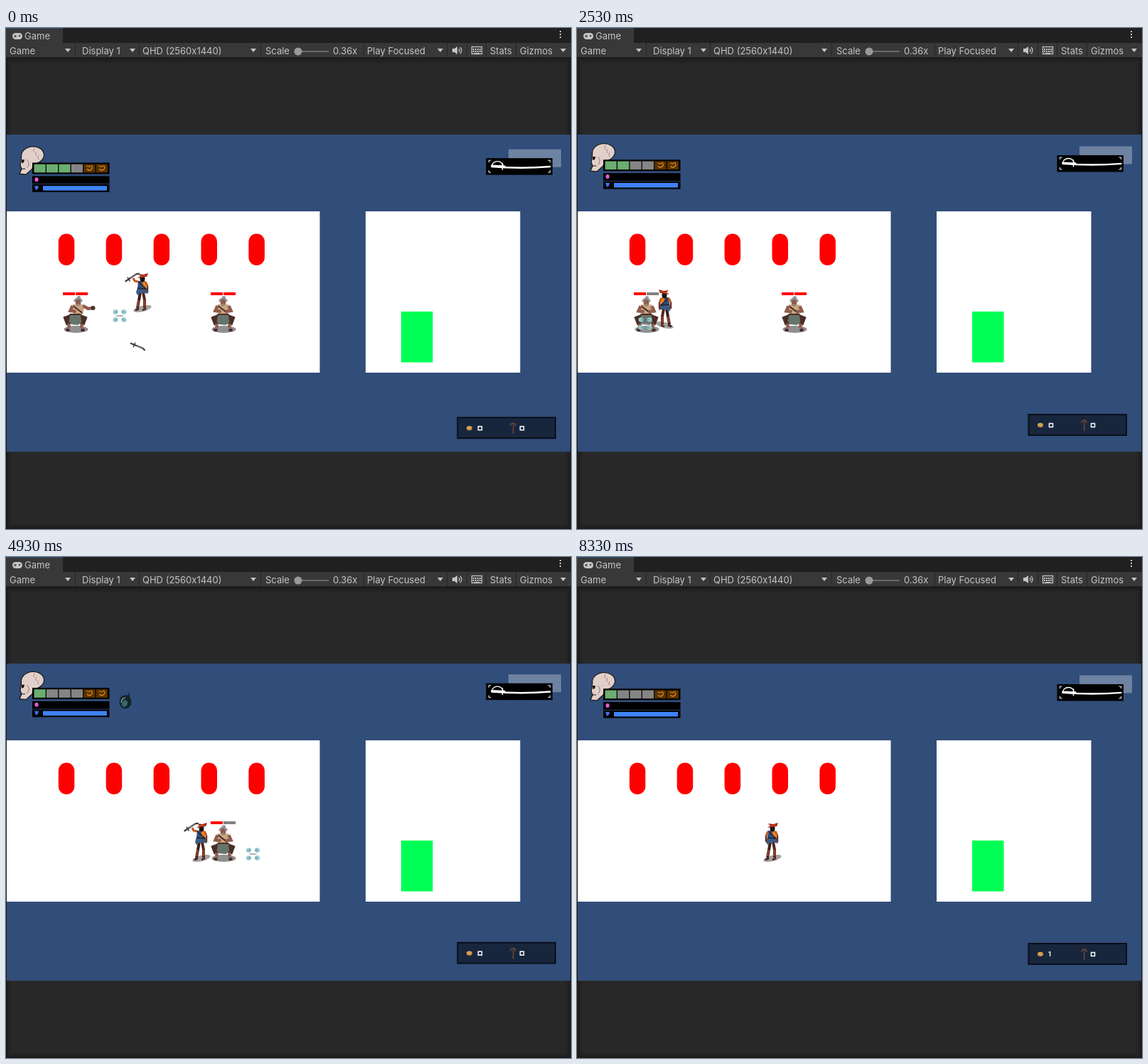
Recreate the animation shown at these times as an HTML page with a canvas. Size 795x705 px, loop 8.39 s.

```html
<!DOCTYPE html>
<html>
<head>
<meta charset="utf-8">
<style>
html, body { margin: 0; width: 100%; height: 100%; overflow: hidden; background: #282828; }
canvas { display: block; }
</style>
</head>
<body>
<canvas id="stage" width="795" height="705"></canvas>
<script>
const g = document.getElementById('stage').getContext('2d');
const LOOP = 8390, STEP = LOOP / 126, TAU = 2 * Math.PI;

// Each foe: position, punch, time hit, time of death
const foes = [
  { x: 97.5, punch: 630, hit: 2150, death: 2700 },
  { x: 305.5, punch: 4700, hit: 4190, death: 4950 },
];
const swings = [0, 2150, 2620, 4130, 4850];
const LOOT = 5130;

// Key points: time, x, y
const walk = [[0, 191, 345], [1250, 141, 370], [2200, 124, 368], [2700, 124, 368], [4200, 261, 374], [4900, 274, 374]];
const aim = [[0, 160, 405], [1330, 108, 400], [2530, 96, 416], [4000, 346, 418], [5400, 348, 418], [6530, 69, 250], [7300, 60, 640]];

const clamp = v => Math.max(0, Math.min(1, v));
const during = (t, start, length) => t >= start && t < start + length;
const sides = draw => [-1, 1].forEach(draw);

function at(keys, t) {
  const i = keys.findIndex(k => k[0] > t);
  if (i < 0) return keys.at(-1).slice(1);
  const a = keys[i - 1], b = keys[i], p = (t - a[0]) / (b[0] - a[0]), e = p * p * (3 - 2 * p);
  return [a[1] + (b[1] - a[1]) * e, a[2] + (b[2] - a[2]) * e];
}

function box(c, x, y, w, h) { g.fillStyle = c; g.fillRect(x, y, w, h); }

function trace(p) {
  g.beginPath();
  for (let i = 0; i < p.length; i += 2) g.lineTo(p[i], p[i + 1]);
}

function poly(c, ...p) { trace(p); g.fillStyle = c; g.fill(); }

function limb(c, w, ...p) {
  trace(p);
  g.strokeStyle = c;
  g.lineWidth = w;
  g.stroke();
}

function oval(c, x, y, rx, ry = rx, tilt = 0) {
  g.fillStyle = c;
  g.beginPath();
  g.ellipse(x, y, rx, ry, tilt, 0, TAU);
  g.fill();
}

function arc(c, w, x, y, rx, ry, from, to, tilt = 0) {
  g.strokeStyle = c;
  g.lineWidth = w;
  g.beginPath();
  g.ellipse(x, y, rx, ry, tilt, from * TAU, to * TAU);
  g.stroke();
}

function pill(c, x, y, w, h) {
  g.fillStyle = c;
  g.beginPath();
  g.roundRect(x, y, w, h, Math.min(w, h) / 2);
  g.fill();
}

function text(s, x, y, size = 13, c = '#c4c4c4', weight = 400) {
  g.font = `${weight} ${size}px Inter, sans-serif`;
  g.fillStyle = c;
  g.fillText(s, x, y);
}

function placed(x, y, draw, { angle = 0, flip = 1, alpha = 1 } = {}) {
  g.save();
  g.globalAlpha *= alpha;
  g.translate(x, y);
  g.rotate(angle);
  g.scale(flip, 1);
  draw();
  g.restore();
}

function toolbar() {
  const ink = '#c4c4c4', bar = '#383838', gap = '#202020';
  box('#282828', 0, 0, 795, 705);
  for (let i = 0; i < 10; i++) {
    g.lineWidth = 1;
    g.strokeStyle = `rgba(18,18,18,${0.6 * (1 - i / 10) ** 2})`;
    g.strokeRect(i + .5, 42.5 + i, 794 - 2 * i, 662 - 2 * i);
  }
  box(gap, 0, 0, 795, 42);
  box(bar, 0, 0, 80, 21);
  box('#27506f', 0, 0, 80, 1);
  box(bar, 0, 21, 795, 20);
  for (const x of [97, 187, 358, 503, 620, 648, 675, 717]) box('#252525', x, 21, 1, 20);
  for (const x of [87, 178, 348, 611, 784]) poly(ink, x - 4, 29, x + 4, 29, x, 34);
  for (let i = 0; i < 3; i++) box(ink, 779, 4 + 4 * i, 2, 2);

  pill(ink, 9, 7, 14, 9);
  limb(bar, 1, 11, 11.5, 15, 11.5);
  limb(bar, 1, 13, 9.5, 13, 13.5);
  box(bar, 18, 10, 2, 2);
  text('Game', 26, 16);
  const labels = { 5: 'Game', 107: 'Display 1', 192: 'QHD (2560x1440)', 365: 'Scale',
    460: '0.36x', 508: 'Play Focused', 681: 'Stats', 723: 'Gizmos' };
  for (const x in labels) text(labels[x], +x, 37);
  box('#6a6a6a', 411, 32, 43, 2);
  oval('#999', 411, 33, 5.5);

  poly(ink, 628, 29, 631, 29, 635, 26, 635, 37, 631, 34, 628, 34);
  for (const r of [3, 6]) arc(ink, 1.3, 635, 31.5, r, r, -.14, .14);
  g.strokeRect(655.5, 26.5, 14, 10);
  for (let i = 0; i < 8; i++) box(ink, 657 + i % 4 * 3, i < 4 ? 29 : 32, 2, 2);
  box(ink, 659, 35, 7, 1);
}

function scene() {
  box('#314d79', 1, 150, 793, 446.5);
  box('#fff', 1, 258, 440.5, 227);
  box('#fff', 506, 258, 217.5, 227);
  box('#00ff55', 556, 399, 44.5, 71.5);
  for (let i = 0; i < 5; i++) pill('#f00', 73.8 + i * 66.9, 289.5, 22.5, 44.5);
}

function foe({ x, punch, hit, death }, t) {
  if (t >= death) return;
  const [skin, dark, hair, apron, cloth] = during(t, hit, 220)
    ? ['#8c090b', '#4e0507', '#a51212', '#650608', '#a50d0d']
    : ['#8f5d4a', '#4b2d26', '#8d9196', '#66756c', '#c9a582'];
  const punching = during(t, punch - 100, 200) || punch < 1000 && t < 200;
  const bob = Math.sin(t / 190) * .5;
  box('#f00', x - 17.5, 372, 17, 4);
  box(t < hit ? '#f00' : '#808080', x + .5, 372, 17, 4);
  placed(x, 378, () => {
    oval('#8f8f8f', 1, 46, 17, 5);
    sides(s => {
      limb(dark, 8, s * 4, 28, s * 12, 31, s * 9, 39);
      limb(skin, 4.5, s * 9, 38, s * 9, 44);
      limb(dark, 4, s * 8, 47, s * 13, 47);
    });
    poly(apron, -7, 25, 7, 25, 9, 36, 4, 40, -6, 39, -9, 35);
    placed(punching ? 4 : 0, bob, () => {
      poly(cloth, -8, 11, 8, 11, 8, 19, 6, 25, -6, 25, -8, 19);
      limb(dark, 2, -7, 13, 6, 23);
      sides(s => {
        if (punching && s > 0) {
          limb(skin, 4.5, 7, 13, 14, 17, 21, 16);
          oval(dark, 21, 16, 3);
        } else limb(skin, 4.5, s * 8, 13, s * 11, 20, s * 3, 21);
      });
      oval(skin, 0, 8, 4, 5);
      arc(hair, 2.5, 0, 7, 5, 4.5, .5, 1);
      oval(hair, 1, 1, 2.5, 2);
      box(hair, -2, 10, 4, 2);
    });
    box(dark, -8, 24, 16, 2);
  });
}

function knife(x, y, angle) {
  placed(x, y, () => {
    limb('#3c3e42', 2.2, -11, 0, 8, -.5, 12, 1);
    limb('#8b8f94', 1, -2, 0, 8, 0);
    limb('#3c3e42', 1.5, -5, -3.5, -5, 3.5);
  }, { angle });
}

function flyingKnife(t, start, x, y, angle) {
  const d = (t - start) * .83;
  if (during(t, start, 900)) knife(x + d * Math.cos(angle), y + d * Math.sin(angle), angle);
}

function player(t) {
  const [x, y] = at(walk, t), moving = Math.abs(x - at(walk, Math.max(0, t - 80))[0]) > .3;
  const stride = moving ? Math.sin(t / 75) * 4 : 2;
  const swinging = swings.some(s => during(t, s, 150));
  placed(x, y, () => {
    oval('#a5a2a0', 1, 50, 13, 4, -.25);
    sides(s => {
      const foot = s * (3 + stride) - 1, leg = s < 0 ? '#3b1c18' : '#55251d';
      limb(leg, 4, s * 2, 27, s * 4, 38, foot, 49);
      limb('#8a402a', 3, s * 4, 38, foot, 47);
      limb(leg, 2.5, foot - 3, 52, foot + 2, 50);
    });
    poly('#d8701e', -5, 11, 5, 11, 6, 21, -5, 21);
    poly('#2e4f7e', -5, 11, 0, 11, 2, 21, -6, 21);
    poly('#f0a01f', 2, 12, 5, 13, 4, 19);
    poly('#375c87', -6, 20, 6, 20, 9, 29, 0, 27, -6, 31, -8, 27);
    limb('#281d20', 1.5, -5, 12, 6, 22, -6, 21);
    sides(s => {
      if (swinging && s < 0) limb('#c5571c', 3, -5, 12, -10, 11, -12, 7);
      else {
        limb('#c5571c', 3, s * 5, 12, s * 8, 18);
        limb('#71301f', 2.5, s * 8, 18, s * 8, 27);
      }
    });
    oval('#171313', 1, 8, 3.5, 4.5);
    poly('#962415', -5, 1, 2, 2, 9, 0, 7, 5, -6, 7, -2, 4);
    limb('#db461d', 1.5, -3, 5, 6, 3);
    if (swinging) knife(-14, 6, -.55);
  }, { flip: during(t, 1400, 2700) ? -1 : 1 });
}

// Green spirit made of broken brush arcs
function ghost({ x, death }, t) {
  const age = t - death, ink = '#0cf01e';
  if (!during(age, 0, 800)) return;
  g.save();
  g.beginPath();
  g.rect(1, 420 - 120 * clamp(age / 350), 440, 150);
  g.clip();
  g.lineCap = 'round';
  const face = (cx, cy, rx, ry, tilt, w) => placed(cx, cy, () => {
    arc(ink, w, 0, 0, rx, ry, .48, 1.14);
    sides(s => arc(ink, w * .8, s * rx * .38, 0, rx * .22, ry * .36, .1, .9));
    arc(ink, w, 0, 0, rx, ry, .22, .36);
  }, { angle: tilt });
  placed(x + 4 + Math.sin((age - 450) / 90) * 2, 360, () => {
    face(0, -38, 13, 17, .35, 2);
    face(7, -5, 7, 13, 0, 1.7);
    arc(ink, 2, -14, -11, 11, 14, .38, .6);
    sides(s => arc(ink, 2, -16 + s * 4, -18, 3, 1.5, .4, .9, -.6));
    arc(ink, 1.8, 0, 4, 16, 20, .32, .48);
    arc(ink, 1.8, 0, 12, 14, 16, -.06, .1);
    sides(s => arc(ink, 1.8, s * 12, 28, 9, 14, s < 0 ? -.1 : .42, s < 0 ? .13 : .64));
    for (let i = 0; i < 4; i++) arc(ink, 1.7, 0, 47, 9, 10, i / 4, i / 4 + .12);
    arc(ink, 1.5, -2, 47, 3, 3, .2, .8);
  }, { alpha: clamp((800 - age) / 200) });
  g.restore();
}

function crosshair(t) {
  const [x, y] = at(aim, t);
  sides(sx => sides(sy => placed(x + sx * 6, y + sy * 5.5, () => {
    oval('#8fc5ca', 0, 0, 3.5, 3.2);
    box('#659da6', -sx * 1.5 - 1, -1, 2, 2);
    box('#c0e2e3', sx * 1.5 - 1, -2, 2, 1);
  })));
  oval('#8c8f92', x, y, 6, .8);
}

function skull() {
  const ink = '#17120f', bone = '#e2cfca';
  const jaw = [22, 176, 20, 189, 22, 194, 19, 201, 28, 202, 37, 194, 39, 186];
  oval(ink, 37.5, 175, 16.5, 12.8, -.1);
  poly(bone, ...jaw);
  limb(ink, 1.2, ...jaw);
  oval(bone, 37.5, 175, 15.4, 11.7, -.1);
  poly(ink, 22, 181, 26, 181, 25, 185, 22, 186);
  limb(ink, 1, 21, 194, 27, 194);
  arc('#8e7771', 1, 28, 187, 4, 6, -.2, .2);
  for (let i = 0; i < 3; i++) arc('#8e7771', .8, 41 + i * 3, 168 + i * 5, 2, 3, .3, .7);
}

function cookie(x, y, s) {
  oval('#a9692b', x, y + .8 * s, 8 * s, 6 * s);
  oval('#dfab5b', x, y - .5 * s, 7.5 * s, 5.5 * s);
  for (let i = 0; i < 6; i++) box('#754419', x + 4.5 * s * Math.cos(i * 2.4), y + 3 * s * Math.sin(i * 2.4), 1.5 * s, 1.5 * s);
}

function saber() {
  box('#6e82a1', 707, 166.5, 74, 25);
  box('#000', 675.5, 179, 93.5, 23.5);
  placed(722.5, 190.5, () => {
    sides(sx => sides(sy => limb('#fff', 1, sx * 40, sy * 8.5, sx * 43, sy * 8.5, sx * 43, sy * 5.5)));
    arc('#fff', 2.4, 2, -40, 150, 42, .205, .295);
    arc('#fff', 1.3, -31, 0, 8, 7, .5, 1);
    limb('#fff', 1.5, -24, -5, -24, 5);
    limb('#fff', 2.2, -40, -1, -20, 0);
  });
}

function counter(x, y, full) {
  if (full) return text('1', x - 4, y + 3, 9, '#fff', 700);
  g.strokeStyle = '#fff';
  g.lineWidth = 1.5;
  g.strokeRect(x - 2.5, y - 2.5, 5, 5);
}

function hud(t) {
  skull();
  const green = 3 - foes.filter(f => t >= f.punch).length;
  box('#000', 37, 185.3, 108.5, 16);
  for (let i = 0; i < 6; i++) {
    const x = 39.5 + i * 17.45;
    box(i < green ? '#6cad70' : i < 4 ? '#858585' : '#5a3203', x, 187.5, 16.2, 11.7);
    if (i < 4) continue;
    arc('#d48a1b', 1.5, x + 8, 192, 4, 4, -.05, .4);
    limb('#d48a1b', 1.2, x + 4, 190, x + 8, 191, x + 12, 189);
  }
  for (const y of [204.2, 215.8]) box('#000', 37, y, 108.5, 10.8);
  box('#3f82f5', 52, 218, 90, 6.5);
  pill('#e65cda', 40.5, 206, 5, 6);
  poly('#3e72ec', 40, 218, 46, 218, 45, 222, 42, 224);
  saber();

  box('#080e19', 634.5, 543, 139.5, 31);
  box('#18263d', 636.5, 545, 135.5, 27);
  cookie(652, 558.8, .5);
  counter(667, 559, t >= LOOT);
  counter(726, 559, false);
  arc('#7b4b32', 1.3, 713.5, 555, 3.5, 3, .45, 1.05);
  limb('#7b4b32', 1.3, 714, 552, 713.5, 567);
}

function egg(t) {
  placed(168, 204, () => {
    oval('#12262d', 0, 0, 8.5, 9.5);
    for (let i = 0; i < 3; i++) poly('#12262d', -8 + i * 4, -4, -5 + i * 5, -9 - i * 2, -1 + i * 4, -3);
    oval('#3b656b', -1, 2, 4, 5, .4);
    arc('#8cc0b9', 1.2, 0, 1, 6, 7, .5, .75);
  }, { alpha: clamp((t - 3950) / 600) * clamp((6050 - t) / 200) });
}

function notice(t) {
  placed(0, 0, () => {
    box('rgba(0,0,0,.5)', 1, 391.5, 82, 25);
    cookie(19.5, 404, 1);
    text('×', 32, 408, 11, '#fff');
    text('1', 44, 407.5, 9, '#fff');
  }, { alpha: clamp((t - LOOT) / 320) * clamp((8150 - t) / 250) });
}

function shake(age, size, decay) {
  return age < 0 ? 0 : size * Math.exp(-age / decay) * Math.cos(age / 350 * TAU);
}

function draw(t) {
  toolbar();
  g.save();
  g.beginPath();
  g.rect(1, 150, 793, 446.5);
  g.clip();
  scene();
  player(t);
  foes.forEach(f => foe(f, t));
  foes.forEach(f => ghost(f, t));
  crosshair(t);
  const dy = shake(t, 4.2, 300) + shake(t - foes[0].punch, 20, 190) + shake(t - foes[1].punch, 3.2, 600);
  placed(0, dy, () => hud(t));
  egg(t);
  notice(t);
  flyingKnife(t, 0, 185, 448, .42);
  flyingKnife(t, 1400, 135, 398, Math.PI);
  flyingKnife(t, LOOT + 20, 267, 401.5, Math.PI);
  g.restore();
}

const start = performance.now();
function tick() {
  const t = (performance.now() - start) % LOOP;
  draw(Math.min(125, Math.floor((t + 6) / STEP)) * STEP);
  requestAnimationFrame(tick);
}
tick();
</script>
</body>
</html>
```
